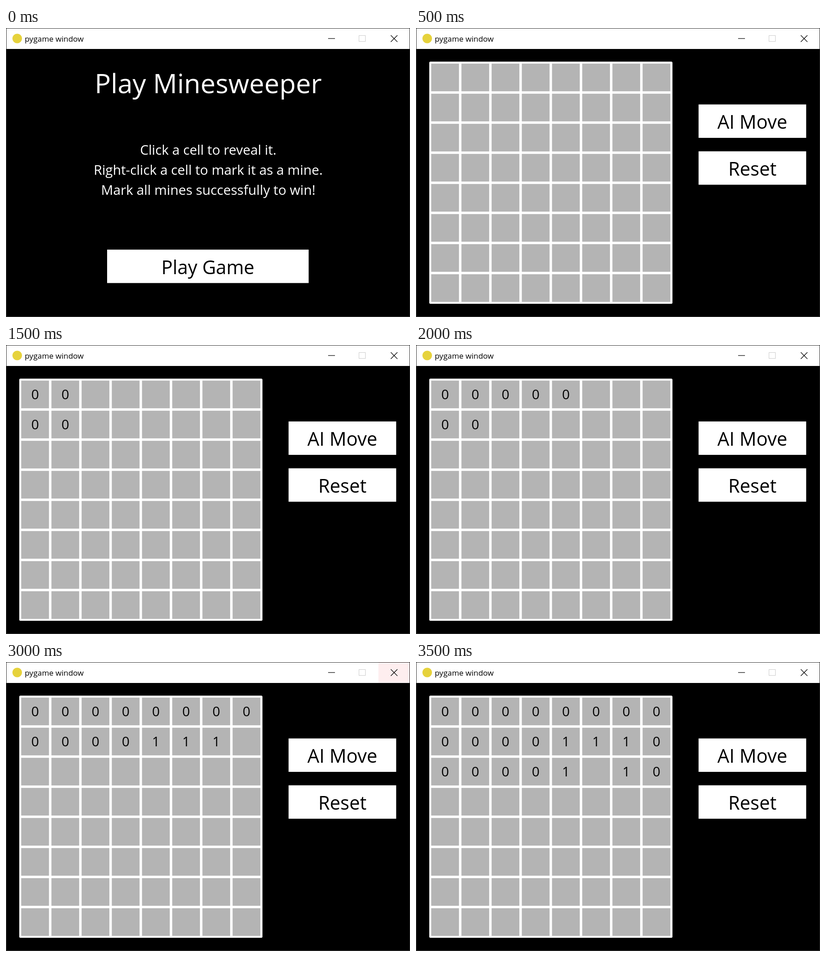
An HTML page for the animation above (4000 ms loop, 883x634 px).

```html
<!DOCTYPE html>
<html lang="en">
<head>
<meta charset="utf-8">
<title>pygame window</title>
<style>
  html, body { margin: 0; width: 100%; height: 100%; overflow: hidden; background: #000; }
  svg { display: block; width: 883px; height: 634px; }
  text { font-family: "Open Sans", "Noto Sans", sans-serif; }
  .mid { text-anchor: middle; }
</style>
</head>
<body>
<svg id="stage" viewBox="0 0 883 634" xmlns="http://www.w3.org/2000/svg"></svg>
<script>
const NS = "http://www.w3.org/2000/svg";
const LOOP = 4000, STEP = 500;
const CELL = 66, SIZE = 8;
const LARGE = 58.67, MEDIUM = 41.07, SMALL = 29.33;

function add(parent, tag, attrs, text) {
  const el = document.createElementNS(NS, tag);
  for (const key in attrs) el.setAttribute(key, attrs[key]);
  if (text !== undefined) el.textContent = text;
  parent.appendChild(el);
  return el;
}
const rect = (p, x, y, width, height, fill, extra) =>
  add(p, "rect", { x, y, width, height, fill, ...extra });
const label = (p, str, x, y, size, fill) =>
  add(p, "text", { x, y, "font-size": size, fill, class: "mid" }, str);

function button(p, str, x, y, w) {
  rect(p, x, y, w, 73.3, "#fff");
  label(p, str, x + w / 2, y + 53.3, MEDIUM, "#000");
}

const stage = document.getElementById("stage");

// Window frame and title bar
rect(stage, 0, 0, 883, 634, "#2b2b2b");
rect(stage, 1, 1, 881, 45, "#fff");
rect(stage, 1.5, 46, 880.5, 586.5, "#000");
add(stage, "circle", { cx: 24.5, cy: 23, r: 10.5, fill: "#e6d23c" });
add(stage, "text", { x: 41, y: 30, "font-size": 17, fill: "#000" }, "pygame window");
const closeBg = rect(stage, 814, 1, 68, 44, "#fff");
rect(stage, 704, 22.5, 15, 1.2, "#000");
rect(stage, 771.5, 16.5, 14, 13, "none", { stroke: "#ccc" });
add(stage, "path", { d: "M841 16l14.5 14.5M855.5 16l-14.5 14.5", stroke: "#000", "stroke-width": 1.2 });

// Start screen
const menu = add(stage, "g", {});
label(menu, "Play Minesweeper", 442, 143, LARGE, "#fff");
[
  "Click a cell to reveal it.",
  "Right-click a cell to mark it as a mine.",
  "Mark all mines successfully to win!"
].forEach((line, i) => label(menu, line, 442, 278 + 44 * i, SMALL, "#fff"));
button(menu, "Play Game", 221, 486.2, 440.5);

// Game screen
const game = add(stage, "g", {});
rect(game, 29, 73.7, 531.5, 531.3, "#fff", { rx: 2.5 });
const digits = [];
for (let row = 0; row < SIZE; row++) {
  for (let col = 0; col < SIZE; col++) {
    const x = 33.3 + col * CELL, y = 78.2 + row * CELL;
    rect(game, x, y, 60.6, 60.6, "#b4b4b4");
    digits.push(label(game, "", x + 30.3, y + 41.2, SMALL, "#000"));
  }
}
button(game, "AI Move", 617.6, 167.7, 235.2);
button(game, "Reset", 617.6, 270.5, 235.2);

// One row of digits per string; a space is a hidden cell
const boards = [
  [], [],
  ["0"],
  ["00", "00"],
  ["00000", "00"],
  ["00000000", "000"],
  ["00000000", "0000111"],
  ["00000000", "00001110", "00001 10"]
];
const hover = { 2: "#fde5e7", 5: "#fde6e8", 6: "#feeeef" };

function draw(time) {
  const step = Math.floor((time % LOOP) / STEP);
  const board = boards[step];
  menu.setAttribute("display", step === 0 ? "inline" : "none");
  game.setAttribute("display", step === 0 ? "none" : "inline");
  closeBg.setAttribute("fill", hover[step] || "#fff");
  digits.forEach((el, i) => {
    const row = board[Math.floor(i / SIZE)] || "";
    el.textContent = (row[i % SIZE] || "").trim();
  });
}

const start = performance.now();
function tick() {
  draw(performance.now() - start);
  requestAnimationFrame(tick);
}
draw(0);
requestAnimationFrame(tick);
</script>
</body>
</html>
```
